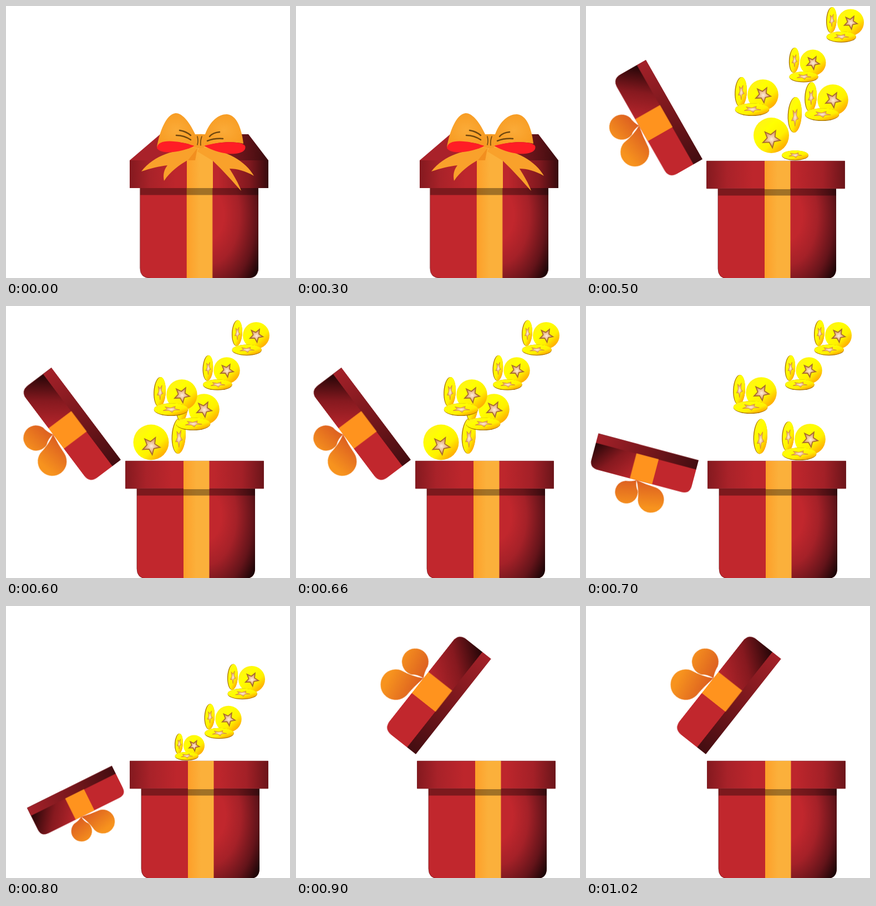
These frames come from a looping animation (512x490 px, 1100 ms). An HTML page:

```html
<!DOCTYPE html>
<html lang="en">
<head>
<meta charset="utf-8">
<title>Gift box with coins</title>
<style>
  html, body { margin: 0; width: 100%; height: 100%; overflow: hidden; background: #fff; }
  svg { display: block; width: 512px; height: 490px; }
  #closed, #open, #body, #rim, #lid { animation: 1100ms step-end infinite; }
  #closed { animation-name: closed; }
  #open { animation-name: open; }
  #body, #rim { animation-name: sway; }
  #lid { animation-name: swing; }
  .burst { animation: burst 1100ms step-end infinite; }

  @keyframes closed { 0% { visibility: visible } 45.4545%, 100% { visibility: hidden } }
  @keyframes open { 0% { visibility: hidden } 45.4545%, 100% { visibility: visible } }
  @keyframes burst { 0% { visibility: visible } 9.0909%, 100% { visibility: hidden } }
  @keyframes sway {
    0% { transform: translate(241.700px, -1px) }
    45.4545% { transform: translate(238px, 0) }
    54.5454% { transform: translate(236px, 0) }
    63.6363% { transform: translate(240px, 0) }
    72.7272% { transform: translate(244px, 0) }
    81.8181%, 100% { transform: translate(239px, 0) }
  }
  @keyframes swing {
    0%, 45.4545% { transform: translate(210px, 276px) rotate(-119.7deg) scale(.94) }
    54.5454% { transform: translate(207px, 277px) rotate(-127deg) scale(.948) }
    63.6363% { transform: translate(203px, 278px) rotate(-165.1deg) scale(.854) }
    72.7272% { transform: translate(191px, 288px) rotate(-206.4deg) scale(.779) }
    81.8181%, 100% { transform: translate(216px, 267px) rotate(-51.7deg) }
  }
</style>
</head>
<body>
<svg viewBox="0 0 512 490">
  <defs>
    <radialGradient id="shade" gradientUnits="userSpaceOnUse" cx="0" cy="0" r="1.14"
      gradientTransform="translate(124 378) scale(97 155)">
      <stop offset=".25" stop-color="#c1272d"/>
      <stop offset=".5" stop-color="#a52128"/>
      <stop offset=".77" stop-color="#64141a"/>
      <stop offset="1" stop-color="#120304"/>
    </radialGradient>
    <linearGradient id="ribbon">
      <stop offset="0" stop-color="#fd9f29"/>
      <stop offset=".5" stop-color="#fbb03b"/>
    </linearGradient>
    <linearGradient id="rimLeft">
      <stop offset="0" stop-color="#84191f"/>
      <stop offset=".35" stop-color="#a82229"/>
      <stop offset=".8" stop-color="#bd262c"/>
    </linearGradient>
    <linearGradient id="rimRight">
      <stop offset=".1" stop-color="#bd262c"/>
      <stop offset=".6" stop-color="#a32027"/>
      <stop offset="1" stop-color="#6c151a"/>
    </linearGradient>
    <linearGradient id="frontRight">
      <stop offset=".1" stop-color="#bd262c"/>
      <stop offset=".65" stop-color="#83191f"/>
      <stop offset="1" stop-color="#370a0d"/>
    </linearGradient>
    <linearGradient id="top">
      <stop offset="0" stop-color="#a9222a"/>
      <stop offset=".55" stop-color="#a9222a"/>
      <stop offset=".8" stop-color="#6a151a"/>
      <stop offset="1" stop-color="#3a0b0e"/>
    </linearGradient>
    <linearGradient id="lidFace" gradientUnits="userSpaceOnUse" x1="135" y1="-75" x2="212" y2="-15">
      <stop offset="0" stop-color="#b5252b"/>
      <stop offset=".5" stop-color="#86191f"/>
      <stop offset="1" stop-color="#270608"/>
    </linearGradient>
    <linearGradient id="lidEdge">
      <stop offset="0" stop-color="#430d11"/>
      <stop offset=".5" stop-color="#78171c"/>
      <stop offset="1" stop-color="#a32129"/>
    </linearGradient>
    <linearGradient id="petal" gradientUnits="userSpaceOnUse" x1="100" y1="-135" x2="112" y2="-74">
      <stop offset=".1" stop-color="#f7931e"/>
      <stop offset="1" stop-color="#dc5f20"/>
    </linearGradient>
    <radialGradient id="loop" cx=".5" cy=".5" r=".6">
      <stop offset="0" stop-color="#fbab38"/>
      <stop offset="1" stop-color="#f79a20"/>
    </radialGradient>
    <linearGradient id="gold" x1=".15" y1=".1" x2=".9" y2=".9">
      <stop offset="0" stop-color="#fff21a"/>
      <stop offset=".3" stop-color="#ffff00"/>
      <stop offset=".65" stop-color="#fff000"/>
      <stop offset="1" stop-color="#ff9d00"/>
    </linearGradient>
    <radialGradient id="copper">
      <stop offset="0" stop-color="#ffeeda"/>
      <stop offset="1" stop-color="#d58a48"/>
    </radialGradient>
  </defs>

  <g id="body">
    <path d="M0 329H213V473Q213 491 195 491H18Q0 491 0 473Z" fill="#c1272d"/>
    <path d="M130 329H213V473Q213 491 195 491H130Z" fill="url(#shade)"/>
    <path d="M0 329V473Q0 491 18 491" fill="none" stroke="#6b161a" stroke-width=".7"/>
    <path d="M84 329h46.500v162h-46.500z" fill="url(#ribbon)"/>
    <path d="M0 329h213v12.500h-213z" opacity=".36"/>
  </g>

  <g id="closed">
    <path d="M278 231H437L473 278H223Z" fill="url(#top)"/>
    <path d="M223 278h104v50h-104z" fill="url(#rimLeft)"/>
    <path d="M372 278h101v50h-101z" fill="url(#frontRight)"/>
    <path d="M334 231H364L373 278V328H326V278Z" fill="url(#ribbon)"/>
    <g fill="#f9a12b">
      <path d="M340 255C305 260 268 267 244 298C262 292 275 289 291 287C284 296 283 305 285 315C296 298 313 286 327 278L346 258Z"/>
      <path d="M350 254C400 260 432 280 447 306C431 297 417 293 403 293C411 306 419 319 424 333C410 318 393 298 373 279L345 262Z"/>
    </g>
    <path d="M345 256L328 278H341Z" fill="#f28f1f"/>
    <g fill="url(#loop)">
      <path d="M341 231C329 205 316 193 306 193C288 195 277 227 272 254C292 240 318 245 340 252Z"/>
      <path d="M359 231C368 207 383 195 398 195C416 196 425 221 428 248C408 243 380 245 358 253Z"/>
    </g>
    <g fill="#ff1d25">
      <path d="M272 256C273 238 309 242 340 252C321 262 281 270 272 256Z"/>
      <path d="M357 252C384 244 424 242 431 252C436 268 397 274 357 252Z"/>
    </g>
    <path d="M339 233Q349 229 360 232L357 255Q349 258 339 254Z" fill="#f59b25"/>
    <g fill="none" stroke="#70470f" stroke-width="2.500" stroke-linecap="round">
      <path d="M313 224Q325 226 333 233M307 233Q321 233 333 241"/>
      <path d="M367 235Q373 228 385 227M363 243Q375 238 391 239"/>
      <path d="M345 235Q347 243 345 250M353 235Q350 243 351 251" stroke-width="1.600"/>
    </g>
  </g>

  <g id="open">
    <g id="rim">
      <path d="M-20.500 279.300h249v49.500h-249z" fill="#c1272d" stroke="#5e1216" stroke-width=".8"/>
      <path d="M-20.500 279.500h105v49h-105z" fill="url(#rimLeft)"/>
      <path d="M130 279.500h98.500v49h-98.500z" fill="url(#rimRight)"/>
      <path d="M84 279h46.500v51h-46.500z" fill="url(#ribbon)"/>
    </g>
    <g id="lid">
      <g fill="url(#petal)">
        <path d="M116 -74Q115 -87 107.700 -95.200A24 24 0 1 1 137.600 -81.200Q126 -80 116 -74Z"/>
        <path d="M116 -74Q106 -91 102 -115A27.500 27.500 0 1 0 73 -78.700Q94 -78 116 -74Z"/>
      </g>
      <path d="M0 0V-56Q0 -74 18 -74H201Q219 -74 219 -56V0Z" fill="#c1272d"/>
      <path d="M130 0V-74H201Q219 -74 219 -56V0Z" fill="url(#lidFace)"/>
      <path d="M0 -20h219v20h-219z" fill="url(#lidEdge)"/>
      <path d="M82 -74h48.500v54.500h-48.500z" fill="#ff931e"/>
    </g>
  </g>
  <g id="coins"></g>
</svg>
<script>
  const coins = document.getElementById('coins');

  function add(parent, tag, attrs) {
    const el = document.createElementNS('http://www.w3.org/2000/svg', tag);
    for (const key in attrs) el.setAttribute(key, attrs[key]);
    return parent.appendChild(el);
  }

  const star = Array.from({ length: 10 }, (_, i) => {
    const a = i * Math.PI / 5 - Math.PI / 2 + 0.5;
    const r = i % 2 ? 0.23 : 0.52;
    return (r * Math.cos(a)).toFixed(3) + ',' + (r * Math.sin(a)).toFixed(3);
  }).join(' ');

  function coin(parent, x, y, rx, ry, drop = 0) {
    const tall = rx < ry, edge = rx !== ry;
    const g = add(parent, 'g', { transform: `translate(${x} ${y}) rotate(${tall ? 3 : 0})` });
    if (edge) {
      add(g, 'ellipse', { cx: tall ? -0.8 : 0, cy: tall ? 0 : 0.7, rx, ry, fill: '#a87400' });
    }
    add(g, 'ellipse', { rx: rx - (tall ? 0.6 : 0), ry: ry - (edge && !tall ? 0.6 : 0), fill: 'url(#gold)' });
    add(g, 'polygon', {
      points: star, fill: 'url(#copper)', stroke: edge ? '#d98a30' : '#a5682e',
      'stroke-width': edge ? 0.8 : 1.7, 'vector-effect': 'non-scaling-stroke',
      transform: `translate(0 ${drop}) scale(${rx} ${ry})`
    });
  }

  // An upright, a facing and a lying coin, placed around the facing one.
  function trio(g, x, y, r, dy = r * 1.07) {
    coin(g, x - r * 1.41, y - r * 0.18, r * 0.39, r * 0.97);
    coin(g, x, y, r, r);
    coin(g, x - r * 0.7, y + dy, r * 1.11, r * 0.41);
  }

  function burst(start, trios, singles = []) {
    const g = add(coins, 'g', { class: 'burst' });
    g.style.animationDelay = start - 1100 + 'ms';
    singles.forEach(s => coin(g, ...s));
    trios.forEach(t => trio(g, ...t));
  }

  burst(500,
    [[477, 29.5, 24], [409, 102, 23.5], [319, 160, 27.8, 26], [445, 169, 27.8, 26]],
    [[334, 233, 32, 32, 6], [377, 196, 12.5, 32, 4], [377, 268.5, 24, 9]]);
  burst(600,
    [[451, 53, 24], [398, 116, 23.7], [357, 186, 27.8, 26], [317, 160, 27.8, 26]],
    [[261.5, 245.5, 32, 32, 6], [312, 234, 12.5, 32, 4]]);
  burst(700,
    [[455, 53, 24], [402, 116, 23.7], [316, 156, 27.8, 26], [404, 240, 27.8, 26]],
    [[315, 235, 12.5, 31.5, 6]]);
  burst(800, [[443, 132, 24], [401, 203.5, 23.7], [339, 251.5, 19, 18.5]]);
</script>
</body>
</html>
```
